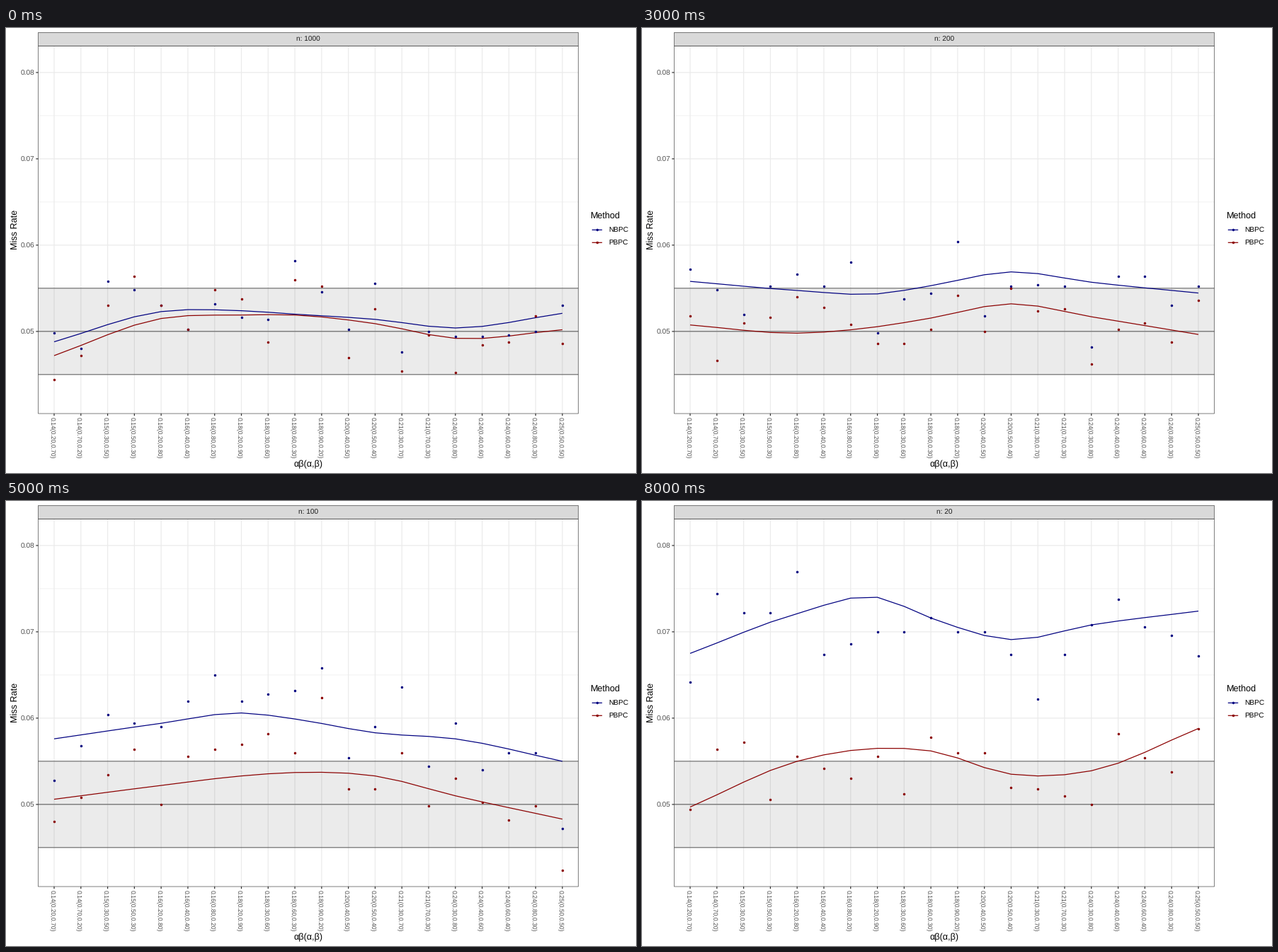
A matplotlib script that plays this animation: 890 px wide and 629 px high, repeating every 9000 ms.

```python
import numpy as np
import matplotlib.pyplot as plt
from matplotlib.animation import FuncAnimation
from matplotlib.patches import Rectangle

plt.rcParams["font.family"] = "Liberation Sans"
plt.rcParams["text.hinting"] = "no_hinting"

W, H, DPI = 890, 629, 64
PX = 72 / DPI                       # one pixel in points
LEFT, RIGHT, TOP, BOTTOM = 45.5, 808.5, 25.3, 545
TRIALS = 5000
THIN, THICK = 0.62, 1.23
NAVY, DARKRED = "#000080", "#8b0000"
GREY20, GREY30, GREY92 = "#333333", "#4d4d4d", "#ebebeb"

SIZES = [1000, 500, 250, 200, 150, 100, 75, 50, 20]

# Trend height (1e-4) at a few knots: NBPC, then PBPC
KNOTS = np.array([1, 5, 8, 10, 13, 16, 20])
TRENDS = {
    1000: ([488, 523, 524, 520, 514, 504, 521], [472, 515, 519, 519, 509, 492, 502]),
    250: ([536, 531, 542, 553, 556, 549, 564], [485, 496, 517, 524, 518, 510, 531]),
    150: ([580, 564, 545, 553, 582, 565, 525], [530, 500, 494, 507, 546, 524, 462]),
    100: ([576, 594, 606, 599, 583, 576, 550], [506, 522, 533, 537, 533, 510, 483]),
    50: ([655, 639, 612, 596, 625, 650, 632], [559, 536, 516, 509, 532, 534, 522]),
    20: ([675, 721, 740, 716, 691, 708, 724], [497, 550, 565, 562, 535, 539, 588]),
}


def parameter_pairs():
    """Pairs (a, b) on a 0.1 grid with a product from 0.14 to 0.25."""
    pairs = [(a, b) for a in range(2, 10) for b in range(2, 10)
             if 14 <= a * b <= 25 and (a != b or a == 5)]
    return sorted(pairs, key=lambda p: (p[0] * p[1], p[0]))


def make_labels():
    labels = [f"{a * b / 100:.2f}({a / 10:.2f},{b / 10:.2f})"
              for a, b in parameter_pairs()]
    labels.insert(5, "0.16(0.40,0.40)")
    return labels


LABELS = make_labels()
X = np.arange(1.0, len(LABELS) + 1)


def smooth(v):
    """Cubic Hermite curve through the knots, read at every label."""
    v = np.asarray(v, float)
    slope = np.gradient(v, KNOTS)
    i = np.clip(np.searchsorted(KNOTS, X, side="right") - 1, 0, len(KNOTS) - 2)
    h = KNOTS[i + 1] - KNOTS[i]
    t = (X - KNOTS[i]) / h
    return (v[i] * (1 + 2 * t) * (1 - t) ** 2
            + slope[i] * h * t * (1 - t) ** 2
            + v[i + 1] * t * t * (3 - 2 * t)
            + slope[i + 1] * h * t * t * (t - 1))


def trends(n):
    """Both trend curves; sizes without knots lie between their neighbours."""
    if n in TRENDS:
        keys = np.array(TRENDS[n])
    else:
        i = SIZES.index(n)
        keys = (np.array(TRENDS[SIZES[i - 1]]) + np.array(TRENDS[SIZES[i + 1]])) / 2
    return np.array([smooth(k) for k in keys]) / 1e4


def scatter(curves, seed):
    """Binomial-sized noise, mostly shared, rounded to whole misses."""
    rng = np.random.default_rng(seed)
    noise = 0.85 * rng.normal(size=len(X)) + 0.45 * rng.normal(size=curves.shape)
    rate = curves + noise * np.sqrt(curves * (1 - curves) / TRIALS)
    return np.rint(np.clip(rate, 0.0424, 0.0812) * TRIALS) / TRIALS


CURVES = [trends(n) for n in SIZES]
POINTS = [scatter(c, n) for c, n in zip(CURVES, SIZES)]


def px_x(i):
    return 68 + (i - 1) * 718 / 19


def px_y(rate):
    return 428.9 - (rate - 0.05) * 12200


fig = plt.figure(figsize=(W / DPI, H / DPI), dpi=DPI, facecolor="white")
ax = fig.add_axes([0, 0, 1, 1])
ax.set_xlim(0, W)
ax.set_ylim(H, 0)
ax.axis("off")


def line(xs, ys, color, width, z):
    return ax.plot(xs, ys, color=color, lw=width * PX, zorder=z, snap=False,
                   solid_capstyle="butt", solid_joinstyle="round")[0]


def dots(xs, ys, color, z):
    return ax.plot(xs, ys, "o", color=color, ms=3.5 * PX, mew=0, zorder=z,
                   snap=False)[0]


def box(x0, y0, x1, y1, z, **style):
    ax.add_patch(Rectangle((x0, y0), x1 - x0, y1 - y0, zorder=z, snap=False, **style))


def text(x, y, s, size, color="black", **kw):
    return ax.text(x, y, s, fontsize=size * PX, color=color, zorder=9,
                   va="baseline", rotation_mode="anchor", **kw)


# Grid, axes and labels
for rate in (0.045, 0.055, 0.065, 0.075):
    line([LEFT, RIGHT], [px_y(rate)] * 2, GREY92, THIN, 1)
for rate in (0.05, 0.06, 0.07, 0.08):
    y = px_y(rate)
    line([LEFT, RIGHT], [y, y], GREY92, THICK, 1)
    line([LEFT - 3.2, LEFT], [y, y], GREY20, THICK, 1)
    text(40.5, y + 3.7, f"{rate:.2f}", 10.1, GREY30, ha="right")
for i, label in zip(X, LABELS):
    x = px_x(i)
    line([x, x], [TOP, BOTTOM], GREY92, THICK, 1)
    line([x, x], [BOTTOM, BOTTOM + 3.2], GREY20, THICK, 1)
    text(x - 5.8, 550.3, label, 8.6, GREY30, rotation=270, ha="left")

# Acceptance band
box(LEFT, px_y(0.055), RIGHT, px_y(0.045), 2, fc="black", alpha=0.08, lw=0)
for rate in (0.045, 0.05, 0.055):
    line([LEFT, RIGHT], [px_y(rate)] * 2, "black", THIN, 3)

# Frame and strip
box(LEFT, TOP, RIGHT, BOTTOM, 6, fc="none", ec=GREY20, lw=THIN * PX)
box(LEFT, 6.4, RIGHT, TOP, 6, fc="#d9d9d9", ec=GREY20, lw=THIN * PX)
strip = text(427, 19.3, "", 10.1, "#1a1a1a", ha="center")

text(427, 620.5, "αβ(α,β)", 12.65, ha="center")
text(15.6, 285.2, "Miss Rate", 12.65, rotation=90, ha="center")

# Legend
text(826, 268.8, "Method", 12.65, ha="left")
for name, color, y in (("NBPC", NAVY, 285.4), ("PBPC", DARKRED, 303.3)):
    line([827.8, 842.2], [y, y], color, THICK, 4)
    dots([835], [y], color, 5)
    text(850.7, y + 3.7, name, 10.1, ha="left")

series = [(line([], [], c, THICK, 4), dots([], [], c, 5)) for c in (NAVY, DARKRED)]


def update(frame):
    strip.set_text(f"n: {SIZES[frame]}")
    artists = [strip]
    for (curve, points), trend, rate in zip(series, CURVES[frame], POINTS[frame]):
        curve.set_data(px_x(X), px_y(trend))
        points.set_data(px_x(X), px_y(rate))
        artists += [curve, points]
    return artists


anim = FuncAnimation(fig, update, frames=len(SIZES), interval=1000,
                     repeat=True, repeat_delay=0, blit=False)
plt.show()
```
